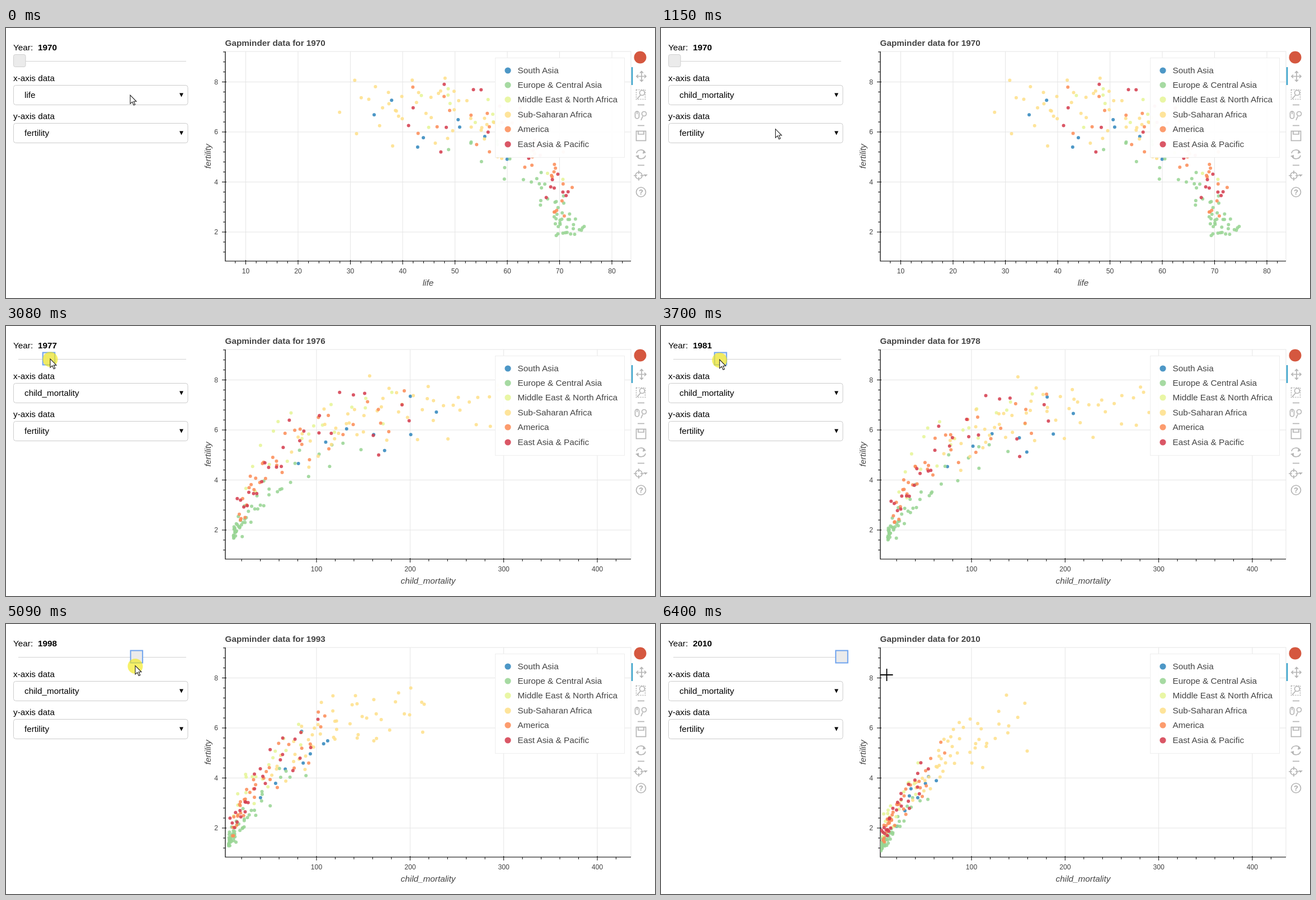
An HTML page that plays this animation: 1160 px wide and 483 px high, repeating every 6.48 s.

```html
<!DOCTYPE html>
<html lang="en">
<head>
<meta charset="utf-8">
<style>
html, body { margin: 0; width: 100%; height: 100%; overflow: hidden; background: #fff; }
svg { display: block; font: 15.3px "Liberation Sans", Arial, sans-serif; }
.tick { font-size: 12.2px; fill: #444; }
.axis { font-style: italic; fill: #444; text-anchor: middle; }
.icon { fill: none; stroke: #b5b5b5; stroke-width: 1.7; }
</style>
</head>
<body>
<svg id="stage" width="1160" height="483" viewBox="0 0 1160 483"></svg>
<script>
const LOOP = 6480, OPEN = 80, CLOSE = 1000, SWITCH = 1230, GRAB = 2160, RELEASE = 5950, CROSS = 6250;
const PLOT_LAG = 350, START_YEAR = 1970;
const PLOT = { x: 392, y: 42, width: 725, height: 375 };
const OPTIONS = ['fertility', 'life', 'child_mortality', 'gdp'];
const stage = document.getElementById('stage');

function add(tag, attrs = {}, parent = stage, text) {
  const node = document.createElementNS('http://www.w3.org/2000/svg', tag);
  set(node, attrs);
  if (text !== undefined) node.textContent = text;
  parent.appendChild(node);
  return node;
}
function set(node, attrs) {
  for (const name in attrs) node.setAttribute(name, attrs[name]);
}
const label = (x, y, text, attrs = {}, parent = stage) => add('text', { x, y, ...attrs }, parent, text);
const path = (d, attrs, parent = stage) => add('path', { d, ...attrs }, parent);
const show = (node, on) => node.setAttribute('visibility', on ? 'visible' : 'hidden');

// Linear interpolation through rows of [time, ...values].
function sample(rows, at) {
  let i = 1;
  while (i < rows.length - 1 && at >= rows[i][0]) i++;
  const [a, b] = [rows[i - 1], rows[i]];
  const k = Math.min(1, Math.max(0, (at - a[0]) / (b[0] - a[0])));
  return a.slice(1).map((v, j) => v + (b[j + 1] - v) * k);
}
function noise(i, salt) {
  const v = Math.sin(i * 12.9898 + salt * 78.233) * 43758.5453;
  return v - Math.floor(v);
}
const spread = (i, salt) => noise(i, salt) + noise(i, salt + 0.5) - 1;

// Child mortality runs from low to high in 1970 and then decays; births scales fertility.
const REGIONS = [
  { name: 'South Asia', color: '#3288bd', count: 8, low: 60, high: 310, skew: 0.4, decay: 0.039, births: 0.92 },
  { name: 'Europe & Central Asia', color: '#99d594', count: 52, low: 14, high: 185, skew: 1.9, decay: 0.034, births: 0.78 },
  { name: 'Middle East & North Africa', color: '#e6f598', count: 20, low: 25, high: 245, skew: 0.6, decay: 0.045, births: 1.1 },
  { name: 'Sub-Saharan Africa', color: '#fee08b', count: 49, low: 75, high: 345, skew: 0.6, decay: 0.022, births: 1.02 },
  { name: 'America', color: '#fc8d59', count: 34, low: 20, high: 250, skew: 1, decay: 0.034, births: 0.95 },
  { name: 'East Asia & Pacific', color: '#d53e4f', count: 26, low: 17, high: 270, skew: 0.75, decay: 0.037, births: 0.98 }
];
const xLife = v => 335 + v * 9.35;
const xChild = v => 387.7 + v * 1.673;
const yFertility = v => 454.5 - v * 44.75;

// Fertility saturates with mortality, life expectancy falls with it.
function country(region, i, salt, years) {
  const rank = ((i + 0.5) / region.count) ** region.skew;
  const decay = region.decay * (1 + 0.35 * spread(i, salt + 20));
  const mortality = region.low * (region.high / region.low) ** rank * Math.exp(-decay * years);
  const saturation = 1 - Math.exp(-mortality / (55 + years / 2));
  const wobble = 1 + 0.26 * spread(i, salt) + 0.05 * Math.sin(years / 8 + i);
  return {
    mortality,
    fertility: Math.max(1, (1.4 + 5.4 * saturation) * region.births * wobble),
    life: 74 - 0.13 * mortality + 4 * spread(i, salt + 40)
  };
}

// Sidebar
label(13, 40, 'Year:');
const yearText = label(57, 40, '', { 'font-weight': 'bold' });
path('M22 59.5H322', { stroke: '#d2d2d2' });
const handle = add('rect', { y: 47.5, width: 21.5, height: 22, fill: '#ebebeb' });

function select(y, name, value) {
  label(13, y - 7, name);
  const box = add('rect', { x: 13.5, y: y + 0.5, width: 311.5, height: 35, rx: 4, fill: '#fff', stroke: '#ccc' });
  path(`M310 ${y + 14.5}h7l-3.5 7z`);
  return { box, text: label(33, y + 23, value) };
}
const xSelect = select(102, 'x-axis data', 'life');
select(170, 'y-axis data', 'fertility');

// Plot
add('rect', PLOT, add('clipPath', { id: 'inside' }));
const title = label(391.5, 32, '', { 'font-weight': 'bold', fill: '#444' });
add('rect', { ...PLOT, fill: 'none', stroke: '#e5e5e5' });

function xAxis(name, scale, step) {
  const g = add('g');
  let grid = '', ticks = '';
  for (let i = 1; scale(i * step / 5) < 1117; i++) {
    const v = i * step / 5, x = scale(v), major = i % 5 === 0;
    if (x < PLOT.x) continue;
    ticks += major ? `M${x} 415V423` : `M${x} 417V421`;
    if (!major) continue;
    grid += `M${x} 42V417`;
    label(x, 439, v, { class: 'tick', 'text-anchor': 'middle' }, g);
  }
  path(grid, { stroke: '#e5e5e5' }, g);
  path(ticks, { stroke: '#000' }, g);
  label(754.5, 461, name, { class: 'axis' }, g);
  return g;
}
const lifeAxis = xAxis('life', xLife, 10);
const childAxis = xAxis('child_mortality', xChild, 100);

for (let i = 3; i < 24; i++) {
  const v = i * 0.4, y = yFertility(v), major = i % 5 === 0;
  if (y < PLOT.y) continue;
  if (major) {
    path(`M392 ${y}H1117`, { stroke: '#e5e5e5' });
    label(379, y + 4.3, v, { class: 'tick', 'text-anchor': 'end' });
  }
  path(major ? `M386 ${y}H394` : `M388 ${y}H392`, { stroke: '#000' });
}
path('M392 42V417H1117', { fill: 'none', stroke: '#000', 'stroke-width': 1.2 });
label(0, 0, 'fertility', { class: 'axis', transform: 'translate(366 229.5) rotate(-90)' });

const dotLayer = add('g', { 'clip-path': 'url(#inside)' });
const dots = REGIONS.map(r => Array.from({ length: r.count },
  () => add('circle', { r: 3, fill: r.color, 'fill-opacity': 0.87 }, dotLayer)));

add('rect', { x: 874.5, y: 53.5, width: 231, height: 178, fill: '#fff', 'fill-opacity': 0.96, stroke: '#eee' });
REGIONS.forEach((r, i) => {
  const baseline = Math.floor(81 + i * 26.4);
  add('circle', { cx: 897, cy: baseline - 5, r: 5.6, fill: r.color, 'fill-opacity': 0.87 });
  label(914.5, baseline, r.name, { fill: '#444' });
});

// Toolbar
add('circle', { cx: 1133.5, cy: 52.5, r: 11, fill: '#d5573f' });
path('M1119 70V102', { stroke: '#3ba3cb', 'stroke-width': 2.6 });
const ring = (cx, cy, r) => add('circle', { cx, cy, r, class: 'icon' });
const box = (x, y, width, height, extra) => add('rect', { x, y, width, height, class: 'icon', ...extra });
const strokes = d => path(d, { class: 'icon' });

strokes('M1136 78V95M1127 86.5H1144M1133 80.5l3-3 3 3M1133 92.5l3 3 3-3M1130 83.5l-3 3 3 3M1141 83.5l3 3-3 3');
box(1126.5, 110.5, 16, 17, { 'stroke-dasharray': '2 2' });
ring(1137, 116, 4.5);
strokes('M1134 120l-6 7');
for (const y of [137.5, 174.5, 245.5]) strokes(`M1129 ${y}h12`);
box(1124.5, 149, 7, 13, { rx: 3.5 });
ring(1140.5, 153.5, 4);
strokes('M1128 149v5M1138 158l-3 7');
box(1126.5, 184.5, 17, 17);
strokes('M1130 185v5h10v-5');
strokes('M1127 224a8 7 0 0 1 15-2M1143 228a8 7 0 0 1-15 2');
ring(1131, 264, 6);
strokes('M1131 255v6M1131 267v6M1122 264h6M1134 264h6');
ring(1135, 293.5, 8.5);
path('M1139 219l5 4-6 2zM1131 233l-6-4 6-2zM1139 262h8l-4 4z', { fill: '#b5b5b5' });
label(1135, 298, '?', { fill: '#a8a8a8', 'text-anchor': 'middle', 'font-size': 13, 'font-weight': 'bold' });

// Option list
const list = add('g');
add('rect', { x: 13.5, y: 137.5, width: 312, height: 82, fill: '#fff', stroke: '#9a9a9a' }, list);
const rows = OPTIONS.map((name, i) => ({
  bar: add('rect', { x: 14, y: 138 + i * 20, width: 311, height: 20 }, list),
  text: label(33, 153.3 + i * 20, name, {}, list)
}));

// Pointer
const glow = add('circle', { r: 13.5, fill: '#f2ea18', 'fill-opacity': 0.65 });
const arrow = path('M0 0V15.5L3.7 12.2L6.3 18L8.8 16.9L6.2 11.3H11z', { fill: '#fff', stroke: '#222', 'stroke-width': 1.1 });
const cross = path('M392 91H414.5M403.5 80V102', { stroke: '#000', 'stroke-width': 1.8 });

const APPROACH = [[300, 222, 120], [920, 213, 179], [CLOSE, 213, 179], [1150, 205, 181], [1610, 18, 58], [1780, 18, 58], [1850, 20, 57]];
const DRAG = [[GRAB, 0], [2450, 0.9], [2780, 7.4], [3350, 8.1], [3700, 11.2], [4470, 19.1], [5090, 28.1], [5900, 40]];
const dragged = t => sample(DRAG, t)[0];

function pointer(t) {
  if (t < GRAB) return sample(APPROACH, t);
  const years = dragged(t), x = 21 + 7.47 * years, y = 57.5 + 0.0215 * years ** 2;
  return t < RELEASE ? [x, y] : sample([[RELEASE, x, y], [CROSS, 403, 89]], t);
}

let drawn = '';
function drawPlot(view, years) {
  if (drawn === view + years) return;
  drawn = view + years;
  title.textContent = 'Gapminder data for ' + (START_YEAR + years);
  show(lifeAxis, view === 'life');
  show(childAxis, view === 'child');
  REGIONS.forEach((region, r) => dots[r].forEach((dot, i) => {
    const c = country(region, i, r + 1, years);
    set(dot, { cx: view === 'life' ? xLife(c.life) : xChild(c.mortality), cy: yFertility(c.fertility) });
  }));
}

function render(t) {
  const [px, py] = pointer(t);
  const years = Math.floor(dragged(t));
  const grabbed = t >= GRAB, open = t >= OPEN && t < CLOSE;

  yearText.textContent = START_YEAR + years;
  set(handle, {
    x: 13.5 + years * 7.47, rx: grabbed ? 0 : 3,
    stroke: grabbed ? '#6fa3ee' : '#cfcfcf', 'stroke-width': grabbed ? 2 : 1
  });

  xSelect.text.textContent = t < CLOSE ? 'life' : 'child_mortality';
  xSelect.box.setAttribute('stroke', open ? '#66afe9' : '#ccc');
  xSelect.box.style.filter = open ? 'drop-shadow(0 0 3px rgba(102,175,233,.6))' : 'none';
  list.setAttribute('display', open ? 'inline' : 'none');
  const hover = py < 138 ? 1 : Math.floor((py - 138) / 20);
  rows.forEach((row, i) => {
    row.bar.setAttribute('fill', i === hover ? '#1e90ff' : '#fff');
    row.text.setAttribute('fill', i === hover ? '#fff' : '#000');
  });

  drawPlot(t < SWITCH ? 'life' : 'child', Math.floor(dragged(t - PLOT_LAG)));

  set(glow, { cx: px, cy: py + 1 });
  show(glow, grabbed && t < RELEASE);
  arrow.setAttribute('transform', `translate(${px} ${py})`);
  show(arrow, t < CROSS);
  show(cross, t >= CROSS);
}

function frame() {
  render(performance.now() % LOOP);
  requestAnimationFrame(frame);
}
frame();
</script>
</body>
</html>
```
